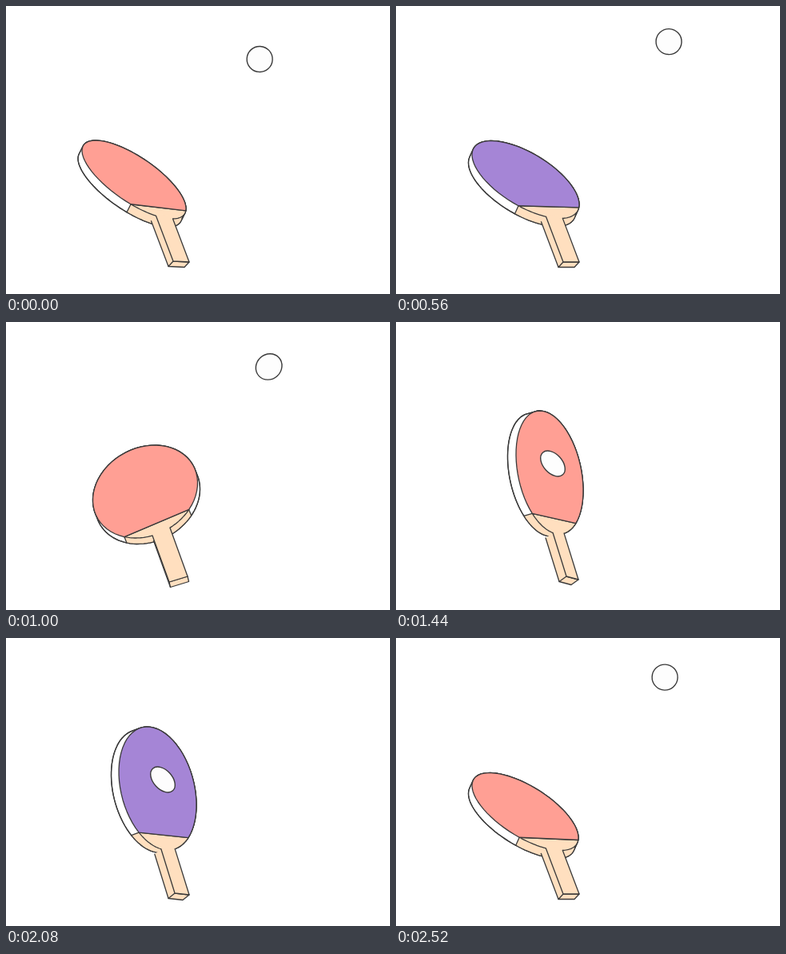
Animation of 480 by 360 pixels, one loop 2560 ms. Source, as an HTML page:

```html
<!DOCTYPE html>
<html lang="en">
<head>
<meta charset="utf-8">
<title>Table tennis</title>
<style>
  html, body { margin: 0; width: 100%; height: 100%; overflow: hidden; background: #fff; }
  svg { display: block; width: 480px; height: 360px; }
  path, ellipse { stroke: #3a3a3a; stroke-width: 1.3; stroke-linejoin: round; stroke-linecap: round; fill: none; }
  .flat { stroke: none; }
</style>
</head>
<body>
<svg id="stage" viewBox="0 0 480 360"></svg>
<script>
const LOOP = 2560, STEP = 40, BEAT = 640, HIT = 160, FLIP = 80;
const RED = '#ff9f94', PURPLE = '#a585d6', WOOD = '#ffdfbf', WHITE = '#fff';

// Ball: share of the way from the apex to the bat, and stretch along the path
const APEX = [345.5, 40.5], REACH = [-149.5, 136.5];
const FLIGHT = [[0, 1], [60, .62], [120, .34], [200, .113], [280, .03], [340, 0],
  [400, .03], [440, .063], [480, .19], [560, .54], [640, 1]];
const STRETCH = [[0, .74], [60, 1.1], [200, 1.06], [280, 1], [600, 1], [640, .74]];

// Bat pose: face centre x y, half width, half height, skew, two angles of the wood line,
// depth x y, handle bottom left x y, bottom right x y, handle depth x, handle lean
const POSES = [
  [80,  178, 191, 24, 77, 1750, 120, 40, 12, -1, 206, 325, 213, 327, 13, -19],
  [200, 174, 212, 65.5, 58, -700, 113.5, 33.4, 3, 7.5, 204, 325, 227, 318, 1.5, -21],
  [280, 168, 216, 69, 51, 450, 107.3, 25.4, -1, 8.5, 206, 322, 229, 318, -2, -22],
  [400, 162, 217, 67, 48.5, 2080, 97.7, 6.3, -4.5, 10, 209, 320, 229, 320, -6, -22],
  [440, 161.5, 217, 66.5, 48.5, 2160, 96.3, 5, -4.5, 10, 209, 320, 229, 320, -6, -22],
  [480, 160, 217, 65, 49, 2352, 93.5, 5, -5, 10, 209, 319, 229, 320, -6, -22],
  [720, 190, 190, 24, 77, 1750, 125, 45, -12, 1, 219, 319, 226, 322, -13, -18]
];
const CONTACT = {
  [RED]: [640, 192, 188, 42, 77, 950, 121, 38.7, -10.5, 3, 213, 318, 228, 322, -9, -18],
  [PURPLE]: [640, 189.5, 188, 48.5, 77, 1000, 118.8, 37.7, -9.5, 3.5, 211, 319, 229, 321, -8, -18]
};
const posesFor = hue => [...POSES.slice(0, -1), CONTACT[hue], POSES[POSES.length - 1]];
const TRACKS = { [RED]: posesFor(RED), [PURPLE]: posesFor(PURPLE) };

const mod = (a, n) => ((a % n) + n) % n;

// Monotone cubic through column k of the rows; column 0 is time
function ease(rows, t, k) {
  const last = rows.length - 1;
  const slope = i => (rows[i + 1][k] - rows[i][k]) / (rows[i + 1][0] - rows[i][0]);
  const tangent = i => {
    if (i === 0) return slope(0);
    if (i === last) return slope(last - 1);
    const a = slope(i - 1), b = slope(i);
    return a * b <= 0 ? 0 : 2 * a * b / (a + b);
  };
  let i = 0;
  while (i < last - 1 && t >= rows[i + 1][0]) i++;
  const h = rows[i + 1][0] - rows[i][0], u = (t - rows[i][0]) / h, v = 1 - u;
  return rows[i][k] * v * v * (1 + 2 * u) + rows[i + 1][k] * u * u * (3 - 2 * u)
    + h * u * v * (tangent(i) * v - tangent(i + 1) * u);
}

const stage = document.getElementById('stage');
function add(tag, attrs) {
  const el = document.createElementNS('http://www.w3.org/2000/svg', tag);
  for (const k in attrs) el.setAttribute(k, attrs[k]);
  return stage.appendChild(el);
}
const fill = (color, flat) => add('path', flat ? { class: 'flat', style: 'fill:' + color } : { style: 'fill:' + color });

const hull = fill(WHITE), rim = fill(WOOD, true), rimEnds = add('path', {});
const hullLine = add('path', {});
const side = fill(WOOD, true), sideLine = add('path', {}), cap = fill(WOOD);
const wood = fill(WOOD), rubber = fill(WHITE);
const grip = fill(WOOD, true), gripLine = add('path', {});
const ball = add('ellipse', { style: 'fill:#fdfdfd;stroke-width:1.4' });

const plus = (p, v) => [p[0] + v[0], p[1] + v[1]];
const line = pts => 'M' + pts.map(p => p[0].toFixed(2) + ' ' + p[1].toFixed(2)).join('L');
const shape = pts => line(pts) + 'Z';
const set = (el, d) => el.setAttribute('d', d);

function drawBat(pose, hue) {
  const [cx, cy, a, b, skew, deg1, deg2, vx, vy, lx, ly, rx, ry, wx, lean] = pose;
  const k = skew / (a * a), drop = Math.sqrt(Math.max(1, b * b - k * skew));
  const depth = [vx, vy], w = [wx, 6.5];
  const at = q => [cx + a * Math.cos(q), cy + k * a * Math.cos(q) + drop * Math.sin(q)];
  const flatten = (x, y) => [x / a, (y - k * x) / drop];
  const arc = (from, to, n = 48) =>
    Array.from({ length: n + 1 }, (_, i) => at(from + (to - from) * i / n));
  const shift = pts => pts.map(p => plus(p, depth));

  const dir = flatten(vx, vy), turn = Math.atan2(dir[1], dir[0]), half = Math.PI / 2;
  const outline = shape([...arc(turn + half, turn + 3 * half), ...shift(arc(turn - half, turn + half))]);
  set(hull, outline);
  set(hullLine, outline);

  const q1 = deg1 * Math.PI / 180, q2 = deg2 * Math.PI / 180;
  const low = arc(q2, q1), lowBack = shift(low);
  set(rim, shape([...low, ...lowBack.slice().reverse()]));
  set(rimEnds, line([low[0], lowBack[0]]) + line([low[48], lowBack[48]]));
  set(wood, shape(low));
  set(rubber, shape(arc(q1, q2 + 2 * Math.PI)));
  rubber.style.fill = hue;

  // Handle edges run up from the bottom corners until they meet the blade
  const up = [lean, -58];
  const meet = p => {
    const o = flatten(p[0] - cx, p[1] - cy), d = flatten(...up);
    const dd = d[0] * d[0] + d[1] * d[1], od = o[0] * d[0] + o[1] * d[1];
    const root = Math.sqrt(Math.max(0, od * od - dd * (o[0] * o[0] + o[1] * o[1] - 1)));
    const s = Math.min(1.4, Math.max(.6, (-od - root) / dd));
    return [p[0] + up[0] * s, p[1] + up[1] * s];
  };
  const bl = [lx, ly], br = [rx, ry], tl = meet(bl), tr = meet(br);
  const leftSeen = w[0] * up[1] - w[1] * up[0] > 0;
  const [top, foot] = leftSeen ? [tl, bl] : [tr, br];
  set(side, shape([top, plus(top, w), plus(foot, w), foot]));
  set(sideLine, line([plus(top, w), plus(foot, w)]));
  set(cap, shape([bl, br, plus(br, w), plus(bl, w)]));
  const tuck = [lean * .05, -3];
  set(grip, shape([plus(tl, tuck), plus(tr, tuck), br, bl]));
  set(gripLine, line([tl, bl, br, tr]));
}

function drawBall(phase) {
  const d = ease(FLIGHT, phase, 1), s = ease(STRETCH, phase, 1);
  const x = APEX[0] + REACH[0] * d, y = APEX[1] + REACH[1] * d;
  ball.setAttribute('rx', 16 * s);
  ball.setAttribute('ry', 16 / Math.sqrt(s));
  ball.setAttribute('transform', `translate(${x.toFixed(2)} ${y.toFixed(2)}) rotate(-42.4)`);
}

function draw(t) {
  const since = t - HIT - FLIP;
  const hue = mod(Math.floor(since / BEAT), 2) ? RED : PURPLE;
  const rows = TRACKS[hue], at = mod(since, BEAT) + FLIP;
  drawBat(rows[0].slice(1).map((_, i) => ease(rows, at, i + 1)), hue);
  drawBall(mod(t - HIT, BEAT));
}

function tick() {
  const t = performance.now() % LOOP;
  draw(Math.floor((t + 8) / STEP) * STEP);
  requestAnimationFrame(tick);
}
tick();
</script>
</body>
</html>
```
